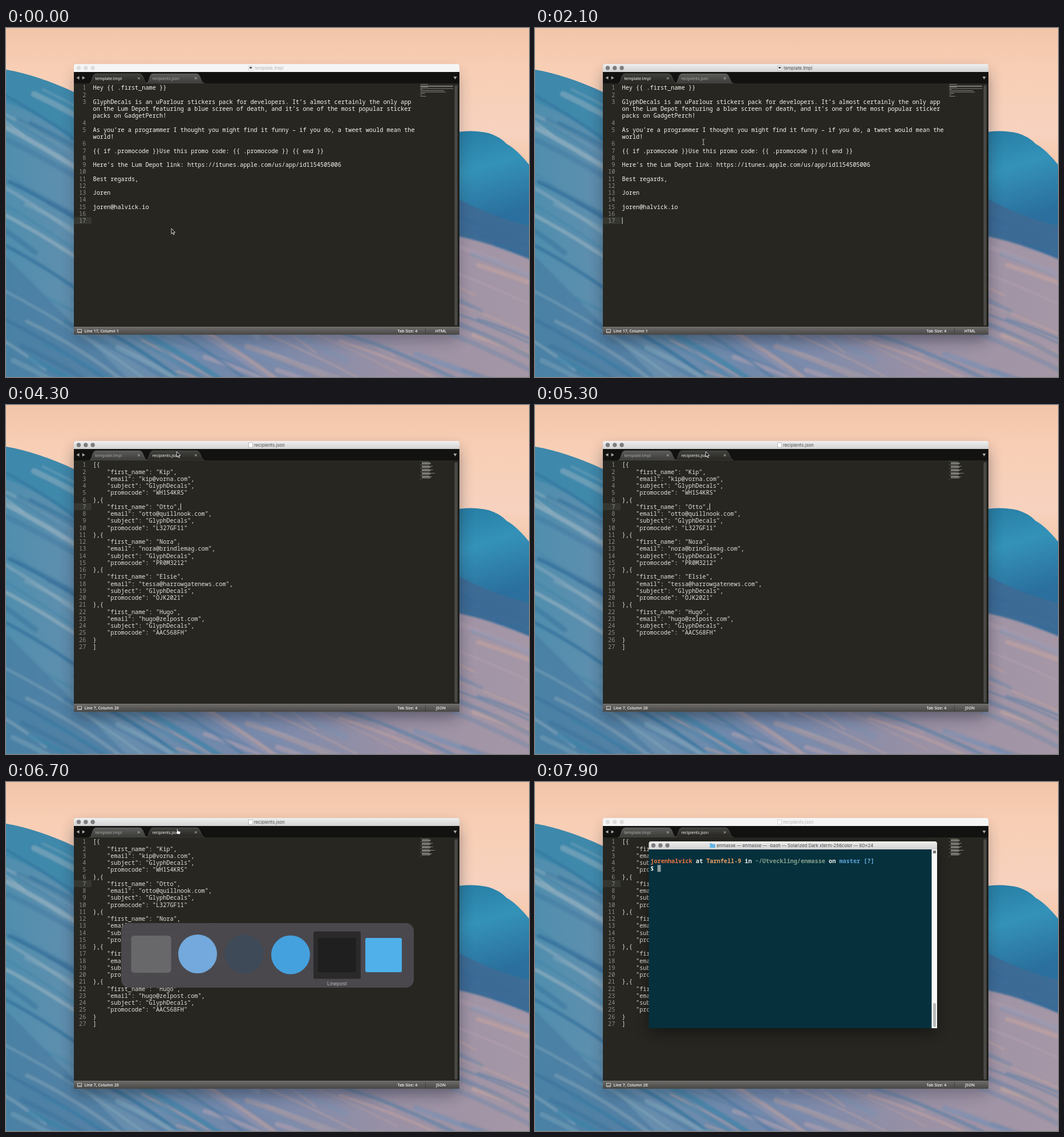
Write an HTML page that moves like this. It is 917x611 px and loops after 8000 ms.

```html
<!DOCTYPE html>
<html lang="en">
<head>
<meta charset="utf-8">
<title>Mail template demo</title>
<style>
html, body { margin: 0; width: 100%; height: 100%; overflow: hidden; background: #f4cbb2; }
svg { display: block; width: 100vw; height: 100vh; }
text { white-space: pre; }
.code { font: 500 10.23px "Noto Sans Mono", "DejaVu Sans Mono", monospace; }
.ui { font: 600 7.05px "Open Sans", "Noto Sans", sans-serif; }
.title { font: 400 7.8px Inter, Roboto, sans-serif; }
</style>
</head>
<body>
<svg id="stage" viewBox="0 0 917 611" preserveAspectRatio="none">
  <defs>
    <linearGradient id="sky" x2="0" y2="1">
      <stop offset="0" stop-color="#f2c5a9"/><stop offset=".12" stop-color="#f8cfb5"/>
      <stop offset=".3" stop-color="#f7d2bf"/><stop offset=".4" stop-color="#f5c8aa"/>
    </linearGradient>
    <linearGradient id="sea">
      <stop offset="0" stop-color="#508eae"/><stop offset=".15" stop-color="#638fae"/>
      <stop offset=".45" stop-color="#7488ab"/><stop offset=".75" stop-color="#9b91a5"/>
      <stop offset="1" stop-color="#a597a6"/>
    </linearGradient>
    <linearGradient id="crest" x2=".25" y2="1">
      <stop offset="0" stop-color="#267ca3"/><stop offset=".45" stop-color="#3492b8"/>
      <stop offset="1" stop-color="#2a6f9d"/>
    </linearGradient>
    <linearGradient id="bar" x2="0" y2="1">
      <stop offset="0" stop-color="#efefef"/><stop offset="1" stop-color="#d2d2d2"/>
    </linearGradient>
    <linearGradient id="tabOff" x2="0" y2="1">
      <stop offset="0" stop-color="#5c5c5a"/><stop offset="1" stop-color="#3b3b38"/>
    </linearGradient>
    <linearGradient id="tabOn" x2="0" y2="1">
      <stop offset="0" stop-color="#41413e"/><stop offset="1" stop-color="#272621"/>
    </linearGradient>
    <linearGradient id="status" x2="0" y2="1">
      <stop offset="0" stop-color="#6c6b69"/><stop offset="1" stop-color="#484745"/>
    </linearGradient>
    <filter id="soft" x="-20%" y="-20%" width="140%" height="140%"><feGaussianBlur stdDeviation="1.6"/></filter>
    <filter id="shade" x="-20%" y="-20%" width="140%" height="140%"><feGaussianBlur stdDeviation="13"/></filter>
    <clipPath id="water"><path d="M0 73 C40 80 75 92 119 112 L795 295 Q850 327 917 345 V611 H0Z"/></clipPath>
    <clipPath id="frame"><path d="M119 67 q0 -4 4 -4 H791 q4 0 4 4 V537 H119Z"/></clipPath>
  </defs>
</svg>
<script>
const LOOP = 8000;
const CHAR = 6.137, ROW = 12.25, TEXT_X = 152.5, BASE = 108.3;
const stage = document.getElementById('stage');

function add(parent, name, attrs = {}, text) {
  const node = document.createElementNS('http://www.w3.org/2000/svg', name);
  for (const key in attrs) node.setAttribute(key, attrs[key]);
  if (text !== undefined) node.textContent = text;
  parent.appendChild(node);
  return node;
}
const group = (parent, attrs) => add(parent, 'g', attrs);
const rect = (parent, x, y, width, height, fill, more) =>
  add(parent, 'rect', { x, y, width, height, fill, ...more });
const path = (parent, d, fill, more) => add(parent, 'path', { d, fill, ...more });
const dot = (parent, cx, cy, r, fill) => add(parent, 'circle', { cx, cy, r, fill });
const label = (parent, kind, x, y, text, fill, more) =>
  add(parent, 'text', { class: kind, x, y, fill, ...more }, text);
const show = (node, on) => node.setAttribute('display', on ? 'inline' : 'none');
const rowY = row => BASE + row * ROW;

// Wallpaper: soft sky, sea and brushed streaks
function drawWallpaper() {
  let seed = 11;
  const random = () => (seed = seed * 16807 % 2147483647) / 2147483647;
  const cool = ['#2f6d99', '#86abbd', '#3c83a8', '#9fb6c3', '#3d739d'];
  const warm = ['#c5a49f', '#4f7ba5', '#b5a1b0', '#d3ac9c', '#7791b4', '#5a82a9'];
  rect(stage, 0, 0, 917, 611, 'url(#sky)');
  const sea = group(stage, { 'clip-path': 'url(#water)' });
  rect(sea, 0, 0, 917, 611, 'url(#sea)');
  const streaks = group(sea, { filter: 'url(#soft)' });
  path(streaks, 'M0 70 Q70 85 125 115 V205 Q60 150 0 130Z', '#3a87ab', { opacity: .8 });
  path(streaks, 'M0 400 Q70 470 210 611 H0Z', '#44749c', { opacity: .5 });
  for (let i = 0; i < 150; i++) {
    const x = -150 + random() * 1020, y = 60 + x * .22 + random() * 540;
    const length = 130 + random() * 230, drop = length * (x < 250 ? .62 : .42);
    const colors = x + length / 2 < 330 ? cool : warm;
    path(streaks, `M${x} ${y} q${length * .5} ${drop * .38} ${length} ${drop}`, 'none', {
      stroke: colors[Math.floor(random() * colors.length)],
      'stroke-width': 2 + random() * 8, opacity: .25 + random() * .4, 'stroke-linecap': 'round'
    });
  }
  path(streaks, 'M780 285 Q850 325 925 340 V408 Q850 375 780 362Z', '#2c6493', { opacity: .85 });
  path(stage, 'M780 184 Q815 177 846 184 Q866 190 878 203 Q895 212 917 239 V346 Q850 331 780 292Z', 'url(#crest)');
}

const templateRows = [
  ['1', 'Hey {{ .first_name }}'], ['2', ''],
  ['3', 'GlyphDecals is an uParlour stickers pack for developers. It’s almost certainly the only app'],
  ['', 'on the Lum Depot featuring a blue screen of death, and it’s one of the most popular sticker'],
  ['', 'packs on GadgetPerch!'], ['4', ''],
  ['5', 'As you’re a programmer I thought you might find it funny – if you do, a tweet would mean the'],
  ['', 'world!'], ['6', ''],
  ['7', '{{ if .promocode }}Use this promo code: {{ .promocode }} {{ end }}'], ['8', ''],
  ['9', 'Here’s the Lum Depot link: https://itunes.apple.com/us/app/id1154505006'], ['10', ''],
  ['11', 'Best regards,'], ['12', ''], ['13', 'Joren'], ['14', ''],
  ['15', 'joren@halvick.io'], ['16', ''], ['17', '']
];

const people = [
  ['Kip', 'kip@vorna.com', 'WH1S4KRS'],
  ['Otto', 'otto@quillnook.com', 'L327GF11'],
  ['Nora', 'nora@brindlemag.com', 'PR0M3212'],
  ['Elsie', 'tessa@harrowgatenews.com', 'OJK2021'],
  ['Hugo', 'hugo@zelpost.com', 'AAC568FH']
];
const jsonLines = people.flatMap(([name, email, code], i) => [
  i ? '},{' : '[{',
  `    "first_name": "${name}",`,
  `    "email": "${email}",`,
  '    "subject": "GlyphDecals",',
  `    "promocode": "${code}"`
]).concat('}', ']');
const jsonRows = jsonLines.map((line, i) => [String(i + 1), line]);

function drawDocument(parent, rows, current, caretX, ink) {
  const page = group(parent);
  rect(page, 119, rowY(current) - 10, 31, ROW, '#353630');
  rows.forEach(([number, line], row) => {
    const indent = line.length - line.trimStart().length;
    label(page, 'code', 140.3, rowY(row), number, '#8d8d86', { 'text-anchor': 'end' });
    label(page, 'code', TEXT_X + indent * CHAR, rowY(row), line.trimStart(), ink);
    rect(page, 726.5 + indent * .63, 98.3 + row * 1.22, (line.length - indent) * .63, .8, '#d8d8d0', { opacity: .65 });
  });
  const caret = rect(page, caretX, rowY(current) - 9.5, 1, 11.5, '#e8e8e2');
  return { page, caret };
}

function drawLights(parent, x, y) {
  return [0, 12.3, 24.6].map(dx => dot(parent, x + dx, y, 3.7, '#7d7d80'));
}

function drawTab(parent, x, name) {
  const shape = path(parent, `M${x} 97 C${x + 6} 96 ${x + 4} 80 ${x + 12} 80 H${x + 88} C${x + 96} 80 ${x + 95} 96 ${x + 102} 97Z`, '#444',
    { stroke: '#6a6a66', 'stroke-width': .5 });
  const text = label(parent, 'ui', x + 10.5, 90.6, name, '#fff', { style: 'font-weight:500' });
  path(parent, `M${x + 85} 86.3 l3.6 3.6 m0 -3.6 l-3.6 3.6`, 'none', { stroke: '#c4c4c0', 'stroke-width': .9 });
  return on => {
    shape.setAttribute('fill', on ? 'url(#tabOn)' : 'url(#tabOff)');
    text.setAttribute('fill', on ? '#ffffff' : '#b0b0ac');
  };
}

function drawEditor() {
  const shadow = rect(stage, 121, 78, 672, 468, '#1c2430', { rx: 6, filter: 'url(#shade)' });
  const win = group(stage, { 'clip-path': 'url(#frame)' });
  const bar = rect(win, 119, 63, 676, 14, 'url(#bar)');
  const lights = drawLights(win, 127.5, 70);
  const icon = rect(win, 425.5, 66, 7, 8, '#fff', { stroke: '#999', 'stroke-width': .6 });
  const mark = rect(win, 427, 68, 4, 3, '#555');
  const title = label(win, 'title', 436, 72.8, '', '#4c4c4c');
  rect(win, 119, 77, 676, 20, '#121211');
  const tabs = [drawTab(win, 146, 'template.tmpl'), drawTab(win, 246, 'recipients.json')];
  path(win, 'M123.5 87.3 l5 -3 v6z M138.7 87.3 l-5 -3 v6z M784.5 85 h6 l-3 5z', '#aaaaa6');
  rect(win, 119, 97, 676, 427, '#272621');
  rect(win, 786.5, 100, 5, 421, '#4b4a46', { rx: 2.5 });
  rect(win, 793, 97, 2, 427, '#1d1d19');
  const docs = [
    drawDocument(win, templateRows, 19, TEXT_X, '#f8f8f2'),
    drawDocument(win, jsonRows, 6, TEXT_X + 25 * CHAR, '#e2e2dc')
  ];
  rect(win, 119, 523.5, 676, 13.5, 'url(#status)');
  rect(win, 119, 523, 676, .8, '#85847f');
  rect(win, 125.5, 527.5, 7, 6, 'none', { stroke: '#ddd', 'stroke-width': .8 });
  rect(win, 125.5, 531.5, 7, .8, '#ddd');
  rect(win, 735, 525, .8, 11, '#3c3b39');
  const place = label(win, 'ui', 137.5, 532.8, '', '#f5f5f5');
  label(win, 'ui', 686.5, 532.8, 'Tab Size: 4', '#f5f5f5');
  const syntax = label(win, 'ui', 762.5, 532.8, '', '#f5f5f5', { 'text-anchor': 'middle' });

  return (page, active, caretOn) => {
    shadow.setAttribute('opacity', active ? .5 : .32);
    bar.setAttribute('fill', active ? 'url(#bar)' : '#f5f5f5');
    lights.forEach(light => light.setAttribute('fill', active ? '#7d7d80' : '#dcdcdc'));
    title.setAttribute('fill', active ? '#4c4c4c' : '#b4b4b4');
    title.setAttribute('x', page ? 435 : 436);
    icon.setAttribute('opacity', active ? 1 : .6);
    show(mark, !page);
    title.textContent = page ? 'recipients.json' : 'template.tmpl';
    place.textContent = page ? 'Line 7, Column 26' : 'Line 17, Column 1';
    syntax.textContent = page ? 'JSON' : 'HTML';
    docs.forEach((doc, i) => {
      show(doc.page, i === page);
      show(doc.caret, caretOn);
      tabs[i](i === page);
    });
  };
}

function drawShell() {
  const win = group(stage);
  rect(win, 202, 116, 500, 322, '#000', { opacity: .45, filter: 'url(#shade)' });
  path(win, 'M199.5 118 V108 q0 -4 4 -4 H701 q4 0 4 4 V118Z', 'url(#bar)');
  drawLights(win, 207.6, 111);
  path(win, 'M306.5 107.5 h3.5 l1 1.2 h5 v6.3 h-9.5z', '#62b5e8');
  label(win, 'title', 318.5, 113.9, 'enmasse — enmasse — -bash — Solarized Dark xterm-256color — 80×24', '#454545');
  rect(win, 199.5, 118, 505.5, 313, '#05303c', { rx: 1 });
  rect(win, 695.5, 118, 9.5, 313, '#f7f7f7');
  rect(win, 698, 387, 5, 42, '#b9b9b9', { rx: 2.5 });
  rect(win, 698, 120, 5, 5, '#777');
  const words = [
    ['jorenhalvick', '#ee7440'], [' at ', '#f4f4ee'], ['Tarnfell-9', '#eca062'], [' in ', '#f4f4ee'],
    ['~/Utveckling/enmasse', '#86a08c'], [' on ', '#f4f4ee'], ['master', '#5c9fd6'], [' [?]', '#72b4e4']
  ];
  const prompt = label(win, 'code', 202.3, 142.4, '', '#fff', { style: 'font-weight:700' });
  words.forEach(([word, fill]) => add(prompt, 'tspan', { fill }, word));
  label(win, 'code', 202.3, 154.8, '$', '#f4f4ee', { style: 'font-weight:700' });
  rect(win, 214.6, 145.3, 6, 12, '#8d9a9b');
  return win;
}

function drawSwitcher() {
  const names = ['Etcher Notes', 'zPrism', 'ClipReel Watcher', 'Wandra', 'Linepost', 'Shelfy'];
  const centre = i => 254.5 + i * 81.5;
  const panel = group(stage);
  rect(panel, 202, 247, 513, 113, '#4b494e', { rx: 14, opacity: .98 });
  const pick = rect(panel, 0, 261.5, 83, 83, '#2b2a2b', { rx: 3 });
  const name = label(panel, 'title', 0, 356, '', '#b9b8ba', { 'text-anchor': 'middle', style: 'font-size:8.6px' });
  rect(panel, centre(0) - 35, 269, 70, 65, '#68686a', { rx: 5 });
  dot(panel, centre(1), 301, 34, '#73a9dc');
  dot(panel, centre(2), 301, 34, '#3e4a58');
  dot(panel, centre(3), 302.5, 34, '#45a0de');
  rect(panel, centre(4) - 33.5, 273, 67, 60, '#1f1f20', { rx: 3 });
  rect(panel, centre(5) - 32, 273, 64, 60, '#4fb0ea', { rx: 3 });
  return (opacity, index) => {
    panel.setAttribute('opacity', opacity);
    show(panel, opacity > 0);
    pick.setAttribute('x', centre(index) - 41.5);
    name.setAttribute('x', centre(index));
    name.textContent = names[index];
  };
}

function drawPointers() {
  const outline = { stroke: '#f2f2f2', 'stroke-width': .9, 'stroke-linejoin': 'round' };
  const shapes = {
    arrow: path(stage, 'M0 0 V9.3 L2.1 7.4 L3.6 10.8 L5.1 10.1 L3.6 6.9 H6.5Z', '#111', outline),
    beam: path(stage, 'M-2 -5 Q0 -5 0 -3.5 Q0 -5 2 -5 M0 -3.5 V3.5 M-2 5 Q0 5 0 3.5 Q0 5 2 5', 'none',
      { stroke: '#d0d0ca', 'stroke-width': .9 }),
    hand: path(stage, 'M0 1 q1 -1.4 2 0 V4 l4 1 q1 .3 .8 1.5 L6 10 H1.2 L-1.6 6.5 q0 -1.4 1.6 -.5Z', '#f4f4f4',
      { stroke: '#111', 'stroke-width': .7 })
  };
  return (kind, x, y) => {
    for (const key in shapes) {
      show(shapes[key], key === kind);
      shapes[key].setAttribute('transform', `translate(${x} ${y})`);
    }
  };
}

drawWallpaper();
const setEditor = drawEditor();
const shell = drawShell();
const setSwitcher = drawSwitcher();
const setPointer = drawPointers();

const FOCUS = 300, MOVE = 1560, CLICK = 3100, SWITCH = 6000, RELEASE = 6900;
const clamp = v => Math.min(1, Math.max(0, v));

function render(t) {
  const page = t < CLICK ? 0 : 1;
  const active = t >= FOCUS && t < RELEASE;
  const blink = (t - (page ? CLICK : 0)) % 1000 < 500;
  setEditor(page, active, active && blink);
  show(shell, t >= RELEASE);

  const index = t < 6300 ? 1 : t < 6500 ? 2 : t < 6700 ? 3 : 4;
  setSwitcher(t < SWITCH ? 0 : 1 - clamp((t - RELEASE) / 250), index);

  const p = clamp((t - MOVE) / 1000), ease = p * p * (3 - 2 * p);
  const x = 290 + 9.3 * ease, y = 351 - 269.5 * ease;
  const kind = t >= 7200 ? '' : t >= 5800 ? 'hand' : t >= MOVE && y > 98 ? 'beam' : 'arrow';
  setPointer(kind, x, y);
}

function tick() {
  render(performance.now() % LOOP);
  requestAnimationFrame(tick);
}
tick();
</script>
</body>
</html>
```
